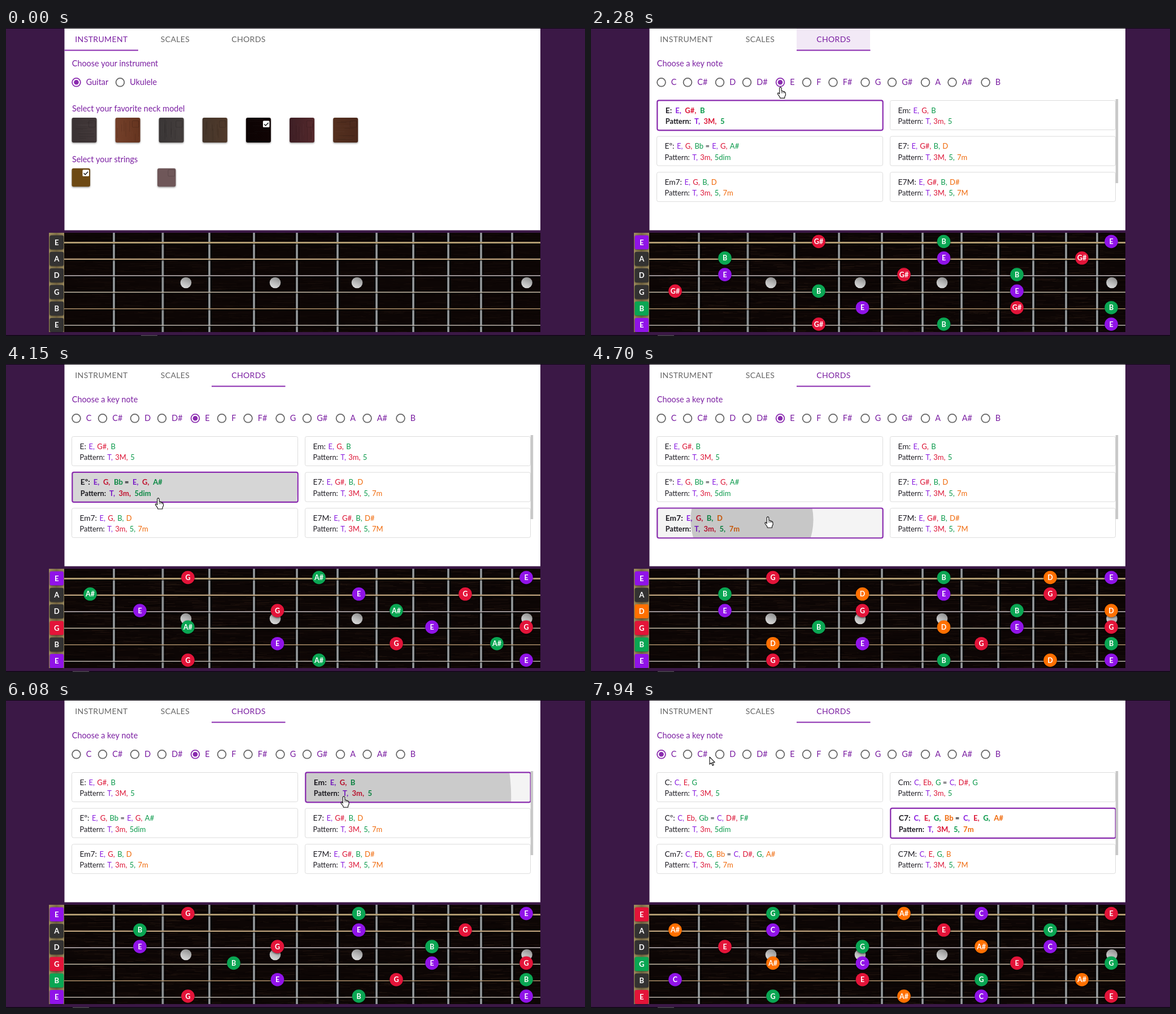
An HTML page with a canvas for the animation above (8000 ms loop, 1025 px wide and 546 px high).

```html
<!DOCTYPE html>
<html lang="en">
<head>
<meta charset="utf-8">
<title>Fretboard chords</title>
<style>
  html, body { margin: 0; width: 100%; height: 100%; overflow: hidden; background: #3b1846; }
  canvas { display: block; }
</style>
</head>
<body>
<canvas id="stage" width="1025" height="546"></canvas>
<script>
const ctx = document.getElementById('stage').getContext('2d');
const LOOP = 8000, TAB_SWITCH = 1810, KEY_SWITCH = 7400;
const FONT = 'Lato, "Open Sans", sans-serif';
const PURPLE = '#8a2baf', TEXT_PURPLE = '#7b1fa2', INK = '#1d1b22';
const DEGREE_COLORS = ['#9013e8', '#e31439', '#0aa653', '#ff7000'];
const TEXT_COLORS = ['#8a1fe0', '#dc1435', '#0a9a4b', '#f0690a'];

// Music
const NAMES = ['C', 'C#', 'D', 'D#', 'E', 'F', 'F#', 'G', 'G#', 'A', 'A#', 'B'];
const LETTERS = 'CDEFGAB';
const TUNING = [4, 9, 2, 7, 11, 4];
const CHORDS = [
  { suffix: '', steps: [0, 4, 7], pattern: ['T', '3M', '5'] },
  { suffix: 'm', steps: [0, 3, 7], pattern: ['T', '3m', '5'] },
  { suffix: 'º', steps: [0, 3, 6], pattern: ['T', '3m', '5dim'] },
  { suffix: '7', steps: [0, 4, 7, 10], pattern: ['T', '3M', '5', '7m'] },
  { suffix: 'm7', steps: [0, 3, 7, 10], pattern: ['T', '3m', '5', '7m'] },
  { suffix: '7M', steps: [0, 4, 7, 11], pattern: ['T', '3M', '5', '7M'] },
];

// Layout
const WIRES = [191, 277.5, 360, 439, 515, 587, 656, 721, 783, 841, 896];
const FRET_X = [149, 237, 322, 403, 480.5, 554, 624.5, 691, 754, 813, 869, 921];
const RADIO_X = [124.5, 171, 228, 276, 335, 382, 428.5, 485.5, 533, 592, 639.5, 698.5];
const CARDS = CHORDS.map((_, i) => ({
  x: i % 2 ? 529.5 : 116.5, y: 128.5 + 63.6 * (i >> 1), w: i % 2 ? 399 : 400, h: 52,
}));

// Timeline
const CURSOR = [
  [110, 950, 540], [280, 432, 52], [350, 424, 47], [660, 350, 4], [880, 440, 25],
  [1040, 440, 25], [1110, 437, 18], [1980, 437, 18], [2510, 268, 163], [2610, 266, 168],
  [2750, 255, 222], [3290, 255, 222], [3360, 260, 217], [3950, 260, 217], [4430, 285, 272],
  [4600, 285, 272], [4700, 313, 271], [5310, 313, 271], [5620, 598, 171], [6080, 598, 171],
  [6340, 590, 217], [6560, 590, 217], [6700, 221, 110], [6870, 76, 85], [7020, 98, 90],
  [7080, 104, 91], [7170, 122, 94], [7560, 122, 94], [7860, 210, 101],
];
const PRESSES = [
  { at: 3680, card: 2, x: 260, y: 217 }, { at: 4516, card: 4, x: 285, y: 276 },
  { at: 5740, card: 1, x: 598, y: 171 }, { at: 6464, card: 3, x: 590, y: 217 },
];
const CLICKS = [1730, 7310, ...PRESSES.map(p => p.at)];
const SELECTIONS = [[0, 0], [3760, 2], [4600, 4], [5820, 1], [6560, 3]];

const clamp = v => Math.min(1, Math.max(0, v));
const smooth = v => v * v * (3 - 2 * v);

// Material "standard" curve, cubic-bezier(.4, 0, .2, 1)
function standardEase(v) {
  let lo = 0, hi = 1, s = 0.5;
  for (let i = 0; i < 18; i++) {
    s = (lo + hi) / 2;
    const x = 1.2 * (1 - s) ** 2 * s + 0.6 * (1 - s) * s * s + s ** 3;
    if (x < v) lo = s; else hi = s;
  }
  return 3 * s * s - 2 * s ** 3;
}

function cursorAt(t) {
  if (t < 110 || (t >= 350 && t < 660)) return null;
  const next = CURSOR.findIndex(k => k[0] > t);
  if (next < 0) return { x: 210, y: 101 };
  const [t0, x0, y0] = CURSOR[next - 1], [t1, x1, y1] = CURSOR[next];
  const p = smooth((t - t0) / (t1 - t0));
  return { x: x0 + (x1 - x0) * p, y: y0 + (y1 - y0) * p };
}

const inside = (p, r) => p && p.x >= r.x && p.x <= r.x + r.w && p.y >= r.y && p.y <= r.y + r.h;

function hoverLevel(card, t) {
  let hits = 0;
  for (let k = 0; k < 6; k++) hits += inside(cursorAt(t - k * 22), card) ? 1 : 0;
  return hits / 6;
}

// Drawing helpers
function roundRect(x, y, w, h, r) {
  ctx.beginPath();
  ctx.roundRect(x, y, w, h, r);
}

function rect(x, y, w, h, color) {
  ctx.fillStyle = color;
  ctx.fillRect(x, y, w, h);
}

function disc(x, y, r, color) {
  ctx.beginPath();
  ctx.arc(x, y, r, 0, Math.PI * 2);
  ctx.fillStyle = color;
  ctx.fill();
}

function polygon(points, x, y) {
  ctx.beginPath();
  points.forEach(([px, py]) => ctx.lineTo(x + px, y + py));
  ctx.closePath();
}

function text(str, x, y, { size = 14.4, color = TEXT_PURPLE, weight = 400, align = 'left', spacing = 0, word = 0 } = {}) {
  ctx.font = `${weight} ${size}px ${FONT}`;
  ctx.letterSpacing = spacing + 'px';
  ctx.wordSpacing = word + 'px';
  ctx.textAlign = align;
  ctx.fillStyle = color;
  ctx.fillText(str, x, y);
  return ctx.measureText(str).width;
}

function withShadow(blur, dy, alpha, draw) {
  ctx.save();
  ctx.shadowColor = `rgba(0,0,0,${alpha})`;
  ctx.shadowBlur = blur;
  ctx.shadowOffsetY = dy;
  draw();
  ctx.restore();
}

function randomizer(seed) {
  return () => (seed = (seed * 16807) % 2147483647) / 2147483647;
}

// Faint horizontal wood grain, drawn once
const grain = document.createElement('canvas');
grain.width = 843;
grain.height = 176;
(() => {
  const g = grain.getContext('2d'), rnd = randomizer(77);
  for (let i = 0; i < 1500; i++) {
    const x = rnd() * 843 - 20, y = rnd() * 176, len = 8 + rnd() * 50, bend = (rnd() - 0.5) * 5;
    g.strokeStyle = rnd() < 0.6 ? `rgba(82,58,42,${0.08 + rnd() * 0.2})` : `rgba(0,0,0,${rnd() * 0.5})`;
    g.beginPath();
    g.moveTo(x, y);
    g.quadraticCurveTo(x + len / 2, y + bend, x + len, y + bend / 2);
    g.stroke();
  }
})();

function drawFretboard(t, notes) {
  rect(103, 363, 843, 176, '#0d0605');
  ctx.globalAlpha = t < TAB_SWITCH ? 0.5 : 0.9;
  ctx.drawImage(grain, 103, 363);
  ctx.globalAlpha = 1;

  for (const x of [318.5, 476.5, 621.5, 922]) {
    const shade = ctx.createLinearGradient(x + 4, 442, x - 4, 461);
    shade.addColorStop(0, '#8d8d8d');
    shade.addColorStop(0.55, '#bcbcbc');
    shade.addColorStop(1, '#dcdcdc');
    disc(x, 451.5, 9.8, shade);
  }
  for (const x of WIRES) {
    rect(x - 4, 363, 9, 176, 'rgba(0,0,0,.45)');
    rect(x - 2, 363, 4, 176, '#73777a');
    rect(x - 1, 363, 2, 176, '#969a9c');
  }
  const stringColors = ['#b09a70', '#b79c78', '#aaa1a4', '#c2b8a5', '#b1926c', '#bdb6ae'];
  const widths = [3, 2.4, 1.8, 1.6, 1.5, 1.5];
  TUNING.forEach((_, i) => {
    const y = 380.5 + 29.3 * i, w = widths[i];
    rect(103, y + w / 2, 843, 2, 'rgba(0,0,0,.5)');
    rect(103, y - w / 2, 843, w, stringColors[i]);
  });

  const nut = ctx.createLinearGradient(76, 0, 103, 0);
  nut.addColorStop(0, '#a1905f');
  nut.addColorStop(0.5, '#7d6d46');
  nut.addColorStop(1, '#a08e62');
  rect(76, 363, 27, 176, nut);

  TUNING.forEach((open, i) => {
    const degree = notes.indexOf(open), y = 380 + 29.3 * i;
    withShadow(3, 1, 0.5, () => {
      roundRect(77.5, y - 12.5, 24.5, 25, 3);
      ctx.fillStyle = degree < 0 ? '#333232' : DEGREE_COLORS[degree];
      ctx.fill();
    });
    text(NAMES[open], 89.8, y + 4.8, { size: 13, weight: 700, color: '#fff', align: 'center' });

    FRET_X.forEach((x, fret) => {
      const pitch = (open + fret + 1) % 12, d = notes.indexOf(pitch);
      if (d < 0) return;
      withShadow(3, 1, 0.6, () => disc(x, y - 1.5, 11.8, DEGREE_COLORS[d]));
      text(NAMES[pitch], x, y + 3, { size: 12.5, weight: 700, color: '#fff', align: 'center' });
    });
  });
}

function drawTabs(t) {
  const chords = t >= TAB_SWITCH;
  const tabs = [['INSTRUMENT', 169, !chords], ['SCALES', 299.5, false], ['CHORDS', 429.5, chords]];
  for (const [label, x, active] of tabs) {
    text(label, x, 25.3, { size: 14, spacing: 0.4, align: 'center', color: active ? TEXT_PURPLE : '#666' });
  }
  const slide = standardEase(clamp((t - TAB_SWITCH) / 300));
  rect(103.5 + 260.5 * slide, 38.5, 130.5, 2, PURPLE);

  const age = t - 1730;
  if (age < 0 || age > 800) return;
  ctx.save();
  ctx.beginPath();
  ctx.rect(364, 1, 130, 39);
  ctx.clip();
  disc(437, 18, 75 * standardEase(clamp(age / 550)), `rgba(123,31,162,${0.2 * clamp((800 - age) / 500)})`);
  ctx.restore();
}

function drawRadio(x, label, on) {
  ctx.beginPath();
  ctx.arc(x, 96.3, 7.4, 0, Math.PI * 2);
  ctx.lineWidth = 1.8;
  ctx.strokeStyle = on ? PURPLE : '#666';
  ctx.stroke();
  if (on) disc(x, 96.3, 4.3, PURPLE);
  text(label, x + 17.3, 101.3);
}

function drawSwatch(x, y, size, [from, to], checked, streaks) {
  withShadow(3, 1.5, 0.4, () => {
    const fill = ctx.createLinearGradient(x, y, x + size, y);
    fill.addColorStop(0, from);
    fill.addColorStop(1, to);
    roundRect(x, y, size, size, 3);
    ctx.fillStyle = fill;
    ctx.fill();
  });
  const rnd = randomizer(Math.round(x * 31 + 7));
  for (let i = 0; i < 14 && streaks; i++) {
    const a = 2 + rnd() * (size - 4), len = rnd() * 20 + 10, b = 2 + rnd() * (size - 4 - len);
    const [sx, sy, sw, sh] = streaks === 'v' ? [a, b, 1, len] : [b, a, len, 1];
    rect(x + sx, y + sy, sw, sh, i % 2 ? 'rgba(0,0,0,.12)' : 'rgba(255,255,255,.025)');
  }
  const cx = x + size - (size > 40 ? 14 : 13.5), cy = y + (size > 40 ? 5.5 : 2.5);
  roundRect(cx, cy, 11.5, 11.5, 1.5);
  if (!checked) {
    ctx.lineWidth = 1;
    ctx.strokeStyle = 'rgba(0,0,0,.16)';
    ctx.stroke();
    return;
  }
  ctx.fillStyle = '#fff';
  ctx.fill();
  ctx.beginPath();
  ctx.moveTo(cx + 2.2, cy + 6);
  ctx.lineTo(cx + 4.7, cy + 8.6);
  ctx.lineTo(cx + 9.6, cy + 3.4);
  ctx.lineWidth = 1.4;
  ctx.strokeStyle = '#111';
  ctx.stroke();
}

function drawInstrumentPage() {
  text('Choose your instrument', 116.8, 68);
  drawRadio(124.5, 'Guitar', true);
  drawRadio(202, 'Ukulele', false);
  text('Select your favorite neck model', 117, 148);
  const woods = [
    ['#3a3233', '#423839', 'h'], ['#74402a', '#65341f', 'v'], ['#3a3636', '#443e3d', 'v'], ['#44352a', '#50392a', 'v'],
    ['#0c0303', '#100404', 'h'], ['#3d1e24', '#55292c', 'v'], ['#54301f', '#4b281b', 'h'],
  ];
  woods.forEach((w, i) => drawSwatch(116.5 + 77.1 * i, 159, 44, w, i === 4, w[2]));
  text('Select your strings', 117, 238);
  drawSwatch(116.5, 248.8, 32.5, ['#6d4913', '#6d4913'], true);
  drawSwatch(268, 248.8, 32.5, ['#6f5759', '#6f5759'], false);
}

function spell(root, step, index) {
  const letter = (LETTERS.indexOf(NAMES[root][0]) + 2 * index) % 7;
  const diff = (root + step - NAMES.indexOf(LETTERS[letter]) + 18) % 12 - 6;
  return LETTERS[letter] + (diff < 0 ? 'b'.repeat(-diff) : '#'.repeat(diff));
}

function drawTokens(tokens, x, y, style) {
  tokens.forEach((token, i) => {
    const str = token + (i < tokens.length - 1 ? ', ' : '');
    x += text(str, x, y, { ...style, color: TEXT_COLORS[i] });
  });
  return x;
}

function drawCard(index, root, selected, t) {
  const card = CARDS[index], { suffix, steps, pattern } = CHORDS[index];
  const hover = hoverLevel(card, t);
  roundRect(card.x, card.y, card.w, card.h, 3);
  ctx.fillStyle = '#fff';
  ctx.fill();
  ctx.fillStyle = `rgba(0,0,0,${0.045 * hover})`;
  ctx.fill();
  ctx.lineWidth = 1;
  ctx.strokeStyle = '#dcdcdc';
  ctx.stroke();

  const weight = selected ? 700 : 400, gap = selected ? 6 : 4.5;
  const style = { size: 13, weight, word: selected ? 3.4 : 1 };
  let x = card.x + (selected ? 15.3 : 14), y = card.y + 22.3;
  const left = x;
  x += text(NAMES[root] + suffix + ':', x, y, { size: 13.8, weight, color: INK }) + gap;
  const spelled = steps.map((s, i) => spell(root, s, i));
  x = drawTokens(spelled, x, y, style);
  if (spelled.some(n => n.includes('b'))) {
    x += text(' = ', x, y, { ...style, color: INK });
    drawTokens(steps.map(s => NAMES[(root + s) % 12]), x, y, style);
  }
  y += 19.2;
  x = left + text('Pattern:', left, y, { size: 12.8, weight, color: INK }) + gap;
  drawTokens(pattern, x, y, style);

  for (const press of PRESSES) {
    const age = t - press.at;
    if (press.card !== index || age < 0 || age > 800) continue;
    const reach = Math.max(press.x - card.x, card.x + card.w - press.x) + 2;
    ctx.save();
    roundRect(card.x, card.y, card.w, card.h, 3);
    ctx.clip();
    disc(press.x, press.y, reach * standardEase(clamp(age / 550)), `rgba(0,0,0,${0.185 * clamp((800 - age) / 500)})`);
    ctx.restore();
  }

  ctx.strokeStyle = PURPLE;
  if (selected) {
    roundRect(card.x + 0.8, card.y - 0.2, card.w - 0.6, card.h + 1, 3);
    ctx.lineWidth = 2.2;
    ctx.stroke();
  } else if (hover) {
    roundRect(card.x, card.y, card.w, card.h, 3);
    ctx.globalAlpha = hover;
    ctx.stroke();
    ctx.globalAlpha = 1;
  }
}

function drawChordsPage(t, root, selected) {
  text('Choose a key note', 116.8, 68);
  const age = t - 7310;
  if (age >= 0 && age < 600) {
    disc(124.5, 96.3, 18 * standardEase(clamp(age / 400)), `rgba(123,31,162,${0.22 * clamp((600 - age) / 350)})`);
  }
  RADIO_X.forEach((x, i) => drawRadio(x, NAMES[i], i === root));
  CARDS.forEach((_, i) => drawCard(i, root, i === selected, t));
  rect(928.7, 126, 4.5, 149, '#c8c8c8');
}

function isClickable(p, t) {
  if (p.y < 40 && p.x > 103 && p.x < 494) return true;
  if (t < TAB_SWITCH) return false;
  if (CARDS.some(c => inside(p, c))) return true;
  return Math.abs(p.y - 96) < 17 && RADIO_X.some((x, i) =>
    p.x > x - 17 && p.x < x + 17 + 10 * NAMES[i].length);
}

const ARROW = [[0, 0], [0, 13], [3, 10.3], [5.2, 15.2], [7.2, 14.3], [5, 9.6], [9.2, 9.4]];
const HAND = [
  [-1.7, 1], [0, -0.4], [1.7, 1], [1.9, 6.2], [4, 6.3], [4.8, 7.3], [6.6, 7.3], [7.3, 8.6], [8.8, 9],
  [9.2, 13.5], [7.6, 16.5], [7.4, 19.2], [-0.6, 19.2], [-1.2, 17], [-5, 11.8], [-4.6, 9.9], [-3, 10.2], [-1.7, 11.8],
];

function drawCursor(t) {
  const p = cursorAt(t);
  if (!p) return;
  if (CLICKS.some(at => t >= at && t < at + 130)) {
    ctx.globalCompositeOperation = 'multiply';
    disc(p.x + 1.5, p.y + 2.5, 9.8, '#fbef3c');
    ctx.globalCompositeOperation = 'source-over';
  }
  const hand = isClickable(p, t);
  polygon(hand ? HAND : ARROW, p.x, p.y);
  ctx.lineJoin = 'round';
  ctx.lineWidth = 1.1;
  ctx.fillStyle = '#fff';
  ctx.strokeStyle = '#111';
  ctx.fill();
  ctx.stroke();
  if (!hand) return;
  ctx.beginPath();
  for (const dx of [1.9, 4.4, 6.9]) {
    ctx.moveTo(p.x + dx, p.y + 7);
    ctx.lineTo(p.x + dx, p.y + 10.5);
  }
  ctx.lineWidth = 0.8;
  ctx.stroke();
}

function render(t) {
  const chords = t >= TAB_SWITCH;
  const root = t < KEY_SWITCH ? 4 : 0;
  const selected = SELECTIONS.filter(s => s[0] <= t).pop()[1];
  const notes = chords ? CHORDS[selected].steps.map(s => (root + s) % 12) : [];

  rect(0, 0, 1025, 546, '#3b1846');
  rect(0, 0, 1025, 1, '#0c0710');
  rect(0, 544.5, 1025, 1.5, '#0c0710');
  if (t < 1730) rect(239, 544.5, 29, 1.5, '#4c4650');
  else if (t > 2000) rect(118, 544.5, 29, 1.5, '#4c4650');
  rect(103.5, 1, 842.5, 357.5, '#fff');

  drawTabs(t);
  if (chords) drawChordsPage(t, root, selected);
  else drawInstrumentPage();
  drawFretboard(t, notes);
  drawCursor(t);
}

const start = performance.now();
function tick() {
  render((performance.now() - start) % LOOP);
  requestAnimationFrame(tick);
}
tick();
</script>
</body>
</html>
```
